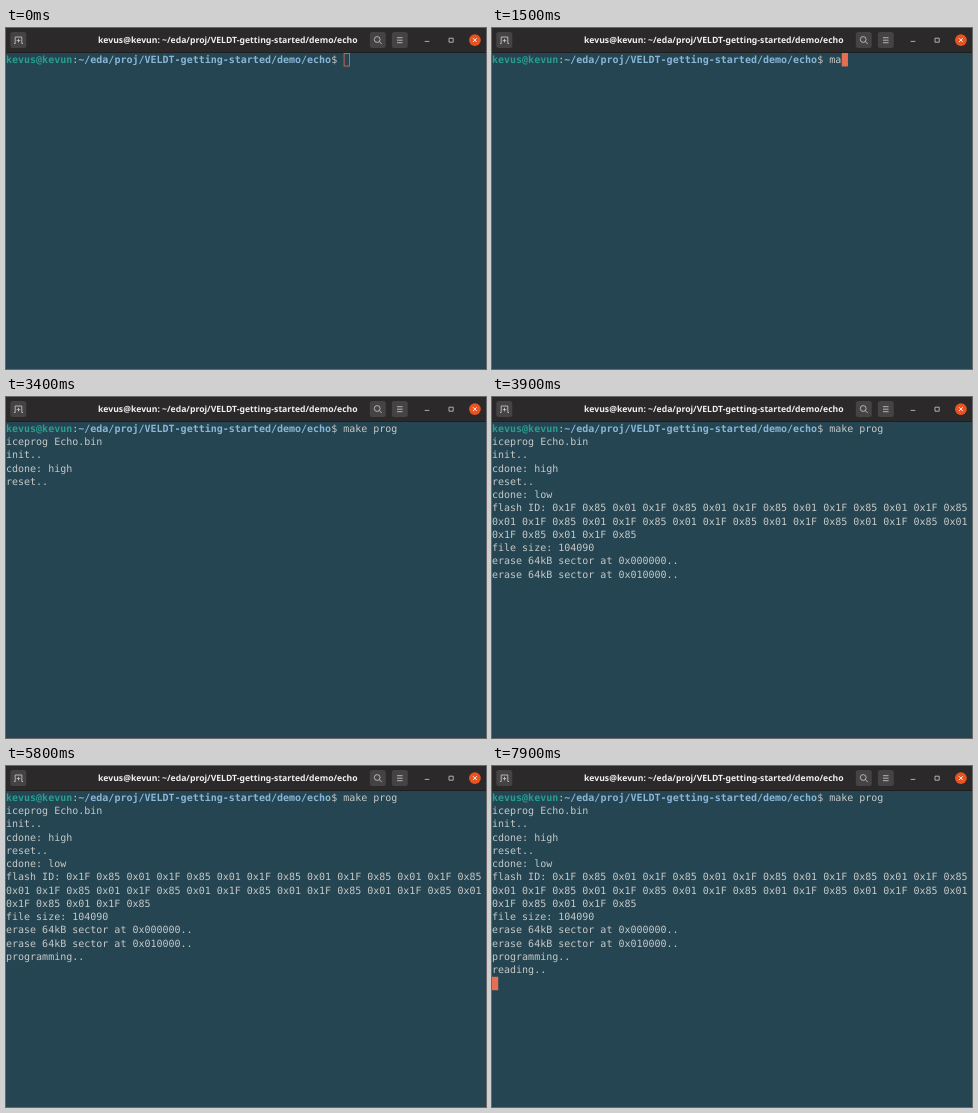
These frames come from a looping animation (480 px wide and 341 px high, 8000 ms). An HTML page:

```html
<!DOCTYPE html>
<html lang="en">
<head>
<meta charset="utf-8">
<title>Terminal</title>
<style>
  html, body { margin: 0; width: 100%; height: 100%; overflow: hidden; background: #254552; }
  svg { display: block; width: 480px; height: 341px; }
  text { white-space: pre; text-rendering: geometricPrecision; }
  #screen { font: 10.016px "DejaVu Sans Mono", monospace; fill: #c6c9c7; }
  #screen .user { fill: #2a9d8f; font-weight: bold; }
  #screen .path { fill: #8ab6d6; font-weight: bold; }
  .title { font: bold 8.65px "Noto Sans", sans-serif; text-anchor: middle; }
  .bar { --bg: #2b2929; --line: #1f1e1e; --btn: #454343; --ink: #f2f1f0; --icon: #d2d0ce; --close: #e95420; }
  .backdrop { --bg: #3d3a3a; --line: #302e2e; --btn: #484545; --ink: #a5a2a0; --icon: #a5a2a0; --close: #555150; }
  .bg { fill: var(--bg); }
  .line { fill: var(--line); }
  .btn { fill: var(--btn); }
  .icon { fill: none; stroke: var(--icon); stroke-width: .8; }
  .title { fill: var(--ink); }
  .close { fill: var(--close); }
  .cross { fill: none; stroke: #f4f2f0; stroke-width: 1; }
</style>
</head>
<body>
<svg viewBox="0 0 480 341">
  <rect width="480" height="341" fill="#254552"/>
  <rect id="cursor" stroke="#e76f51"/>
  <g id="screen"></g>
  <g id="active" class="bar"></g>
  <g id="backdrop" class="bar backdrop"></g>
</svg>
<script>
const LOOP = 8000, COLS = 80, CHAR_W = 6.03, ROW_H = 13.27, TOP = 25, BASELINE = 9.7;
const BLINK = 600, FOCUS = 800;
const user = 'kevus@kevun', path = '~/eda/proj/VELDT-getting-started/demo/echo';
const prompt = `${user}:${path}$ `;
const $ = id => document.getElementById(id);

const bytes = Array.from({ length: 35 }, (_, i) => ['0x1F', '0x85', '0x01'][i % 3]).join(' ');

// [time, text appended to the terminal]
const keys = [
  [1400, 'm'], [1500, 'a'], [1600, 'k'], [1700, 'e'], [1800, ' '],
  [2200, 'p'], [2300, 'r'], [2500, 'og '], [2800, '\n']
];
const output = [
  [2800, 'iceprog Echo.bin\ninit..\n'],
  [3200, 'cdone: high\nreset..\n'],
  [3600, `cdone: low\nflash ID: ${bytes}\nfile size: 104090\nerase 64kB sector at 0x000000..\n`],
  [3900, 'erase 64kB sector at 0x010000..\n'],
  [4200, 'programming..\n'],
  [7700, 'reading..\n']
];

const button = x => `<rect class="btn" x="${x}" y="4" width="16" height="16" rx="2.5"/>`;
const bar = `
  <rect class="bg" width="480" height="25"/>
  <rect class="line" y="24" width="480" height="1"/>
  ${button(4.3)}${button(363.8)}${button(385.8)}
  <path class="icon" d="M8 15.5H9.2V9H15.8V15.5H17M12.5 10.8V14.4M10.7 12.6H14.3"/>
  <text class="title" x="221.8" y="15.1">${user}: ${path}</text>
  <circle class="icon" cx="371.2" cy="11.5" r="2.9"/>
  <path class="icon" d="M373.3 13.6L375.8 16.1M391 9.7H396.6M391 12.2H396.6M391 14.7H396.6"/>
  <path class="icon" d="M418.7 13.4H423.3M443 10.2H447.2V14.2H443Z"/>
  <circle class="close" cx="468.9" cy="12.1" r="5.9"/>
  <path class="cross" d="M467 10.2L470.8 14M470.8 10.2L467 14"/>`;
$('active').innerHTML = $('backdrop').innerHTML = bar;

const textUntil = (list, t) => list.filter(e => e[0] <= t).map(e => e[1]).join('');
const wrap = line => line.match(new RegExp(`.{1,${COLS}}`, 'g')) || [''];
const clamp = v => Math.min(1, Math.max(0, v));

function rowMarkup(row, i) {
  const body = i ? row : `<tspan class="user">${user}</tspan>:<tspan class="path">${path}</tspan>` +
    row.slice(prompt.length - 2);
  return `<text x="0" y="${TOP + BASELINE + i * ROW_H}">${body}</text>`;
}

function drawCursor(t, rows) {
  const focused = t >= FOCUS;
  const lastKey = keys.reduce((last, [time]) => time <= t ? time : last, FOCUS);
  const on = !focused || Math.floor((t - lastKey) / BLINK) % 2 === 0;
  const stroke = focused ? 0 : .8;
  const row = rows.length - 1;
  const attrs = {
    x: rows[row].length * CHAR_W + stroke / 2,
    y: TOP + row * ROW_H + stroke / 2,
    width: CHAR_W + .2 - stroke,
    height: ROW_H + .2 - stroke,
    fill: focused ? '#e76f51' : 'none',
    'stroke-width': stroke,
    visibility: on ? 'visible' : 'hidden'
  };
  for (const name in attrs) $('cursor').setAttribute(name, attrs[name]);
}

let shown;
function render(t) {
  const text = prompt + textUntil(keys, t) + textUntil(output, t);
  const rows = text.split('\n').flatMap(wrap);
  if (text !== shown) {
    $('screen').innerHTML = rows.map(rowMarkup).join('');
    shown = text;
  }
  drawCursor(t, rows);
  $('backdrop').setAttribute('opacity', clamp(t / 250) * clamp((900 - t) / 200));
}

const start = performance.now();
function tick() {
  render((performance.now() - start) % LOOP);
  requestAnimationFrame(tick);
}
tick();
</script>
</body>
</html>
```
